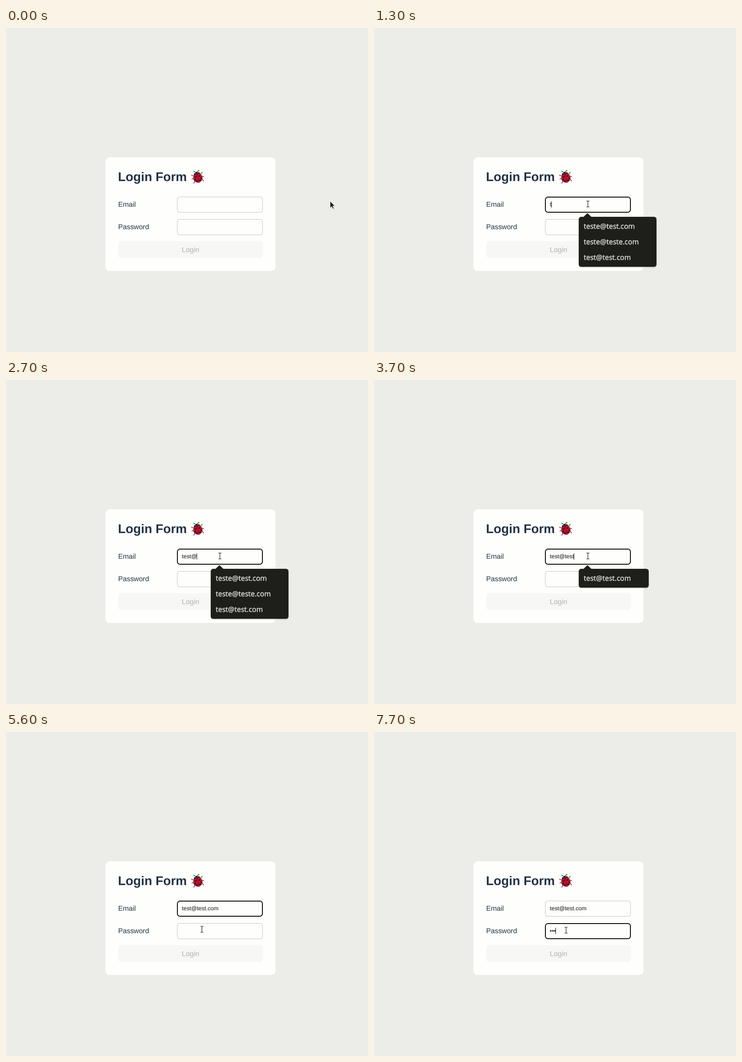
An HTML page that plays this animation: 792x707 px, repeating every 8000 ms.

```html
<!DOCTYPE html>
<html lang="en">
<head>
<meta charset="utf-8">
<title>Login form</title>
<style>
  html, body { margin: 0; width: 100%; height: 100%; overflow: hidden; background: #ecede8; }
  svg { display: block; }
  text { font-family: "Liberation Sans", Arial, sans-serif; text-rendering: geometricPrecision; white-space: pre; }
  .title { font-size: 27.4px; font-weight: 700; fill: #203243; }
  .label { font-size: 15.4px; fill: #213343; }
  .value { font-size: 12.5px; fill: #111; }
  .button { font-size: 15.6px; fill: #b1b2ae; text-anchor: middle; }
  .hint { font-family: "Open Sans", "Noto Sans", sans-serif; font-size: 15.5px; fill: #e3e4df; stroke: #e3e4df; stroke-width: .4; }
  .field { fill: #fefffc; stroke: #cfd0cc; stroke-width: 1.3; }
  .field.on { stroke: #111; stroke-width: 2; }
  #popup { filter: drop-shadow(0 1.5px 1.2px rgba(0, 0, 0, .35)); }
</style>
</head>
<body>
<svg width="792" height="707" viewBox="0 0 792 707">
  <rect width="792" height="707" fill="#ecede8"/>
  <rect x="217.5" y="282" width="372" height="248" rx="9" fill="#fefffc"/>
  <text class="title" x="245.1" y="334">Login Form</text>

  <g id="bug" transform="translate(419.3 325.3) rotate(-14) scale(.95)" fill="none" stroke-linecap="round">
    <path d="M-9 -5L-13 -8M-11 1L-14 1M-9 8L-12 12M9 -5L13 -8M11 1L14 2M9 8L11 12" stroke="#4b4b4b" stroke-width="1.6"/>
    <path d="M-3 -11Q-3 -15 -6 -15M3 -11Q4 -15 7 -14" stroke="#555" stroke-width="1.5"/>
    <ellipse cy="2" rx="10.8" ry="11" fill="#d3082f"/>
    <path d="M-8.5 -5Q-6 -12.5 0 -12.5Q6 -12.5 8.5 -5Q0 -8 -8.5 -5Z" fill="#2d302f"/>
    <path d="M0 -6V13" stroke="#55101a" stroke-width="1.2"/>
    <g fill="#2b2224">
      <circle cx="-4.6" cy="-1.5" r="2.3"/><circle cx="4.6" cy="-1.5" r="2.3"/>
      <circle cx="-7" cy="4.5" r="2"/><circle cx="7" cy="4.5" r="2"/>
      <circle cx="-3.6" cy="8" r="2.1"/><circle cx="3.6" cy="8" r="2.1"/>
    </g>
    <path d="M-4 -10.5L-2.5 -11M3 -11L4.5 -10.4" stroke="#d8d8d2" stroke-width="1.3"/>
  </g>

  <text class="label" x="245.4" y="390.2">Email</text>
  <text class="label" x="245.4" y="439.2">Password</text>
  <rect class="field" id="emailBox"/>
  <rect class="field" id="passBox"/>
  <text class="value" id="email" x="384.8" y="389"></text>
  <text class="value" id="pass" x="384.8" y="438"></text>
  <rect id="caret" width="1" height="14" fill="#111"/>

  <rect x="245.6" y="465.4" width="316" height="36.4" rx="6.5" fill="#f7f8f5"/>
  <text class="button" x="403.7" y="489">Login</text>

  <g id="popup">
    <path d="M457.5 413L467 404L476.5 413Z" fill="#1e1f1a"/>
    <rect id="panel" x="448" y="412" rx="5.5" fill="#1e1f1a"/>
    <g id="hints"></g>
  </g>

  <g id="arrow">
    <path d="M1 1.5V16.5L4.6 13.2L7 18.6L9.6 17.4L7.2 12.2H12Z" fill="#0003"/>
    <path d="M0 0V15.3L3.5 12.1L5.8 17.2L8.4 16L6.1 11.1H10.6Z" fill="#1b1b1b" stroke="#fff" stroke-width="1"/>
  </g>
  <g id="beam" fill="none">
    <path d="M-3.5 -6.5H3.5M0 -6.5V6.5M-3.5 6.5H3.5" stroke="#fff" stroke-width="3"/>
    <path d="M-3.3 -6.5H-.8L0 -5.6L.8 -6.5H3.3M0 -5.6V5.6M-3.3 6.5H-.8L0 5.6L.8 6.5H3.3" stroke="#222" stroke-width="1.2"/>
  </g>
</svg>
<script>
const $ = id => document.getElementById(id);
const LOOP = 8000;
const ROW = 33.8;

const lists = {
  all: { width: 229, items: [
    "zelindrotmauvi48@br...", "zelindro.mauvi@luzira....", "zelindro.mauvi@orbiela....",
    "teste@test.com", "zelindromauvi.torliino...", "zelindromauvi.torlino@..."] },
  some: { width: 170, items: ["teste@test.com", "teste@teste.com", "test@test.com"] },
  one: { width: 153, items: ["test@test.com"] }
};

// Each step changes only the listed parts of the state.
const steps = [
  [0, { email: "", dots: 0, focus: "", caret: false, list: "", cursor: "arrow", x: 709, y: 377.5 }],
  [300, { x: 598, y: 398 }],
  [400, { cursor: "beam", x: 480, y: 386 }],
  [700, { focus: "email", caret: true, list: "all", x: 468, y: 384 }],
  [1200, { email: "t" }],
  [1300, { list: "some" }],
  [1400, { email: "te" }],
  [1600, { email: "tes" }],
  [1700, { email: "test" }],
  [1900, { list: "", caret: false }],
  [2300, { list: "some", caret: true }],
  [2500, { caret: false }],
  [2700, { email: "test@", caret: true }],
  [3000, { list: "one" }],
  [3300, { email: "test@t" }],
  [3400, { email: "test@te" }],
  [3700, { email: "test@test" }],
  [4300, { email: "test@test." }],
  [4400, { email: "test@test.c" }],
  [4700, { email: "test@test.co" }],
  [4800, { email: "test@test.com" }],
  [4900, { list: "" }],
  [5300, { x: 467, y: 381 }],
  [5400, { caret: false }],
  [5600, { x: 428.6, y: 430.5 }],
  [5700, { x: 424, y: 432 }],
  [5800, { x: 420.3, y: 432.5 }],
  [5900, { focus: "pass", caret: true }],
  [6600, { caret: false }],
  [7400, { dots: 1, caret: true }],
  [7700, { dots: 3 }]
];

function show(el, on) {
  el.style.display = on ? "" : "none";
}

function drawField(box, top, on) {
  const inset = on ? 1 : 0.65;
  const size = { x: 374 + inset, y: top + inset, width: 188 - 2 * inset, height: 35 - 2 * inset, rx: 5.5 };
  for (const key in size) box.setAttribute(key, size[key]);
  box.classList.toggle("on", on);
}

function drawPopup(name) {
  show($("popup"), name);
  if (!name) return;
  const { width, items } = lists[name];
  $("panel").setAttribute("width", width);
  $("panel").setAttribute("height", Math.round(items.length * ROW + 7.4));
  $("hints").innerHTML = items.map((item, i) =>
    `<text class="hint" x="458.8" y="${438.2 + i * ROW}">${item}</text>`).join("");
}

function draw(s) {
  drawField($("emailBox"), 368, s.focus === "email");
  drawField($("passBox"), 417, s.focus === "pass");
  $("email").textContent = s.email;
  $("pass").textContent = "•".repeat(s.dots);
  show($("caret"), s.caret);
  if (s.caret) {
    const end = 384.8 + $(s.focus).getComputedTextLength();
    $("caret").setAttribute("x", Math.max(385, Math.floor(end)));
    $("caret").setAttribute("y", s.focus === "email" ? 378 : 427);
  }
  drawPopup(s.list);
  for (const kind of ["arrow", "beam"]) show($(kind), s.cursor === kind);
  $(s.cursor).setAttribute("transform", `translate(${s.x} ${s.y})`);
}

const start = performance.now();
let shown = 0;

function tick(now) {
  const t = Math.max(0, now - start) % LOOP;
  const past = steps.filter(([at]) => at <= t);
  if (past.length !== shown) {
    shown = past.length;
    draw(Object.assign({}, ...past.map(step => step[1])));
  }
  requestAnimationFrame(tick);
}
tick(start);
</script>
</body>
</html>
```
